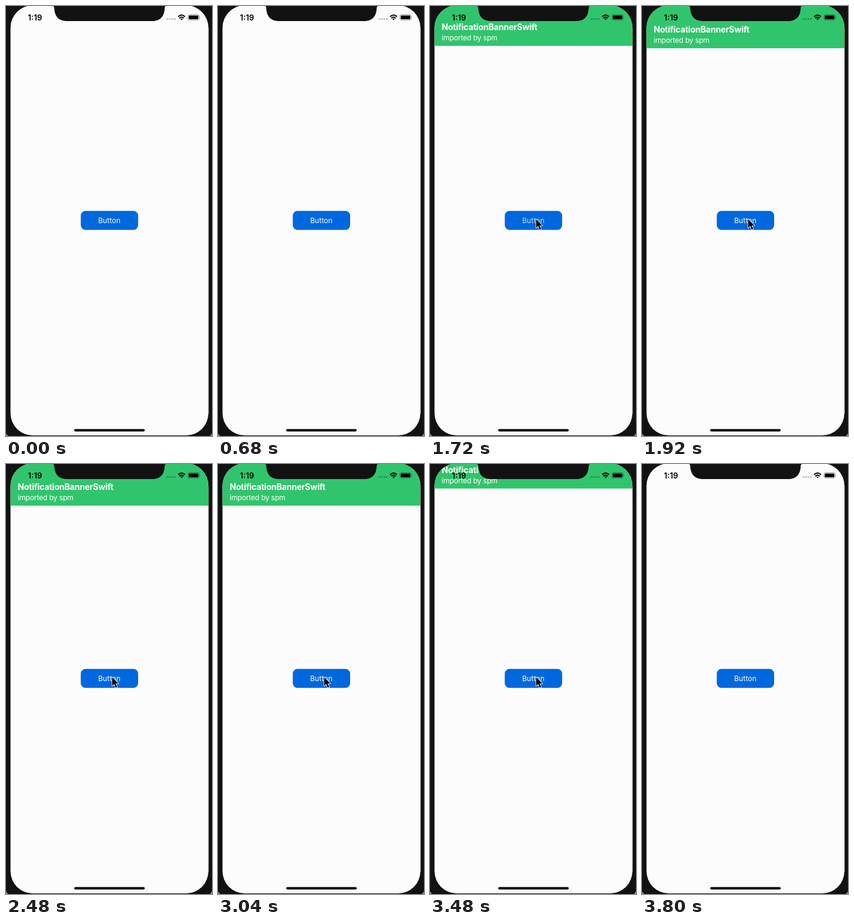
An HTML page that plays this animation: 343 by 713 pixels, repeating every 4000 ms.

```html
<!DOCTYPE html>
<html lang="en">
<head>
<meta charset="utf-8">
<title>Banner demo</title>
<style>
  html, body { margin: 0; width: 100%; height: 100%; overflow: hidden; background: #121212; }
  svg { display: block; width: 343px; height: 713px; }
  text { font-family: Inter, Roboto, sans-serif; }
  .title { font-size: 14px; font-weight: 700; letter-spacing: -.22px; }
  .sub { font-size: 12px; letter-spacing: -.2px; }
  .time { font-size: 13px; font-weight: 600; }
  .label { font-size: 12px; text-anchor: middle; }
</style>
</head>
<body>
<svg viewBox="0 0 343 713">
  <defs>
    <clipPath id="screen"><rect x="7.5" y="-1" width="329.5" height="713" rx="37"/></clipPath>
  </defs>
  <rect width="343" height="713" fill="#121212"/>
  <path d="M0 708Q1 711 4 713H0ZM343 708Q342 711 339 713H343Z" fill="#888"/>
  <path d="M337.5 36V676" stroke="#555" stroke-width="1"/>

  <g clip-path="url(#screen)">
    <rect width="343" height="713" fill="#fcfcfc"/>
    <g id="banner" fill="#fff">
      <rect y="-20" width="343" height="89" fill="#30c56c"/>
      <text class="title" x="19.5" y="43">NotificationBannerSwift</text>
      <text class="sub" x="19.5" y="60">imported by spm</text>
    </g>
  </g>

  <!-- status bar -->
  <text class="time" x="36.5" y="23.5">1:19</text>
  <g opacity=".25">
    <circle cx="268.8" cy="21.6" r="1.5"/>
    <circle cx="272.9" cy="21.6" r="1.5"/>
    <circle cx="277" cy="21.6" r="1.5"/>
    <circle cx="281.1" cy="21.6" r="1.5"/>
  </g>
  <g fill="none" stroke="#000" stroke-width="1.9">
    <path d="M286.6 17.8Q292.3 12.4 298 17.8"/>
    <path d="M288.6 20.2Q292.3 16.8 296 20.2"/>
  </g>
  <path d="M290.3 21.6Q292.3 20 294.3 21.6L292.3 23.8Z"/>
  <rect x="303" y="14.4" width="18.6" height="9" rx="2.5" fill="none" stroke="#000" stroke-opacity=".4"/>
  <rect x="304.4" y="15.8" width="15.8" height="6.2" rx="1.3"/>
  <path d="M322.7 17.3Q324.2 18.9 322.7 20.5Z" opacity=".45"/>

  <path d="M77.5 0Q80 0 80.3 3C81 18 88 25 103 25H242C257 25 263.5 18 264.3 3Q264.6 0 267 0Z" fill="#121212"/>

  <rect x="124.5" y="339.7" width="95.5" height="31.6" rx="8" fill="#0068de"/>
  <text class="label" id="label" x="172" y="360" fill="#fff">Button</text>
  <rect x="113.5" y="701.6" width="117.5" height="4" rx="2"/>

  <g id="cursor">
    <path d="M0 0V14.5L3.4 11.3L6 17.3L8.4 16.3L5.8 10.4H10.4Z" stroke="#fff" stroke-width="1.6" paint-order="stroke" stroke-linejoin="round"/>
  </g>
</svg>
<script>
const LOOP = 4000, FRAME = 40, HEIGHT = 69;
const $ = id => document.getElementById(id);
const banner = $('banner'), label = $('label'), cursor = $('cursor');
const ramp = (t, a, b) => Math.min(1, Math.max(0, (t - a) / (b - a)));
const place = (el, x, y) => el.setAttribute('transform', `translate(${x} ${y})`);
const easeInOut = p => p * p * (3 - 2 * p);

// Damped spring, going from 1 to 0 with a slight overshoot.
function spring(s) {
  return s <= 0 ? 1 : Math.exp(-11.76 * s) * (Math.cos(12 * s) + .98 * Math.sin(12 * s));
}

function bannerY(t) {
  const hidden = t < 3370 ? spring((t - 1545) / 1000) : easeInOut(ramp(t, 3370, 3620));
  return -HEIGHT * hidden;
}

function draw(t) {
  place(banner, 0, bannerY(t));
  banner.style.display = t < 1545 || t >= 3620 ? 'none' : '';

  const pressed = ramp(t, 1460, 1520) - ramp(t, 1560, 1800);
  label.style.opacity = 1 - .8 * pressed;

  const far = (1 - ramp(t, 1140, 1580)) ** 2.4;
  const leave = ramp(t, 3520, 3770) ** 2;
  place(cursor, 176.7 + 169 * (far + leave), 353.5 + 93 * far - 24 * leave);
  cursor.style.display = t < 1160 || t >= 3800 ? 'none' : '';
}

const start = performance.now();
function tick() {
  const t = (performance.now() - start) % LOOP;
  draw(Math.floor(t / FRAME) * FRAME);
  requestAnimationFrame(tick);
}
tick();
</script>
</body>
</html>
```
